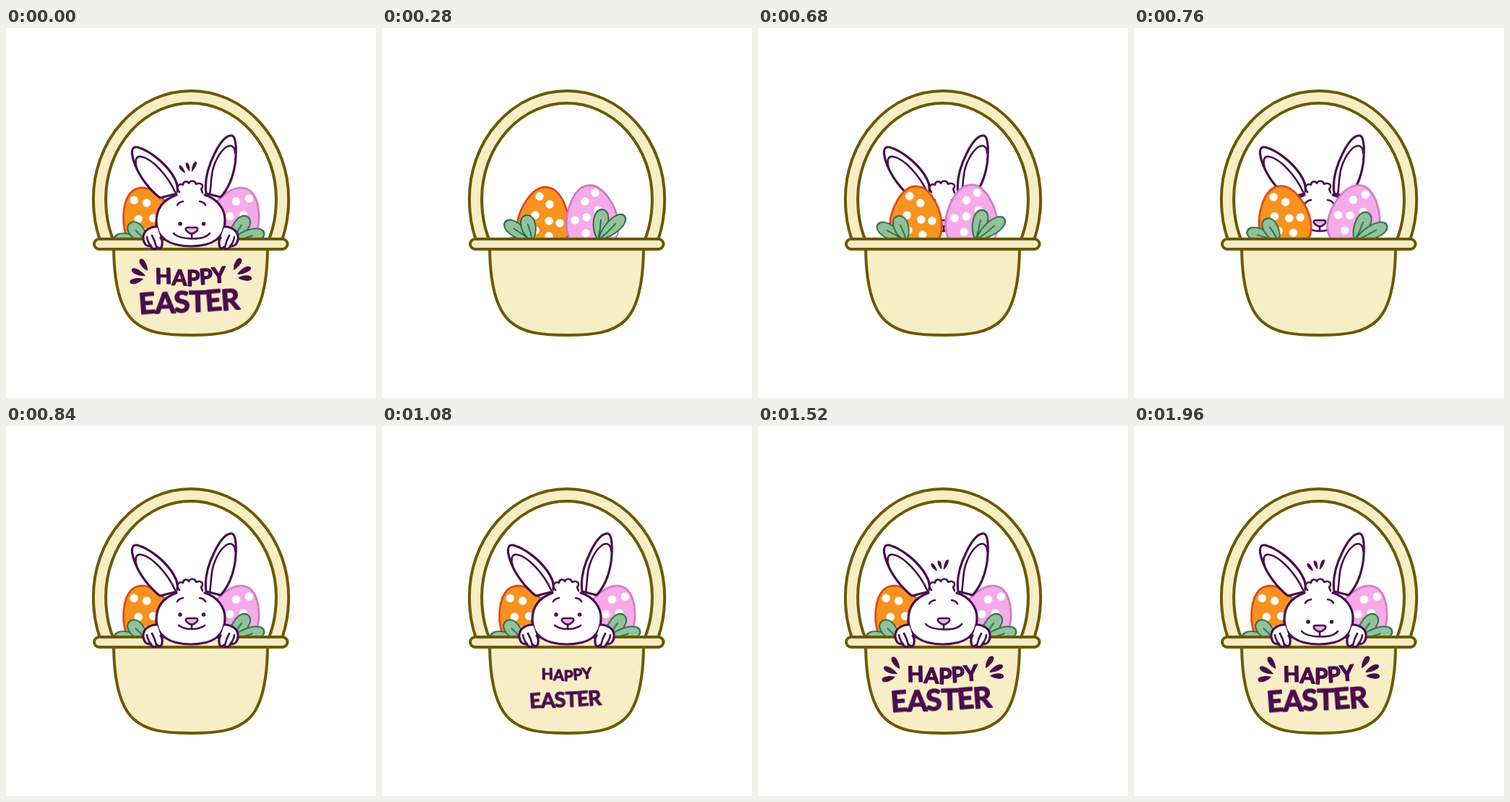
Animation, 512 px wide and 512 px high, one loop 2880 ms. Source, as an HTML page without scripts:

```html
<!DOCTYPE html>
<html lang="en">
<head>
<meta charset="utf-8">
<title>Happy Easter</title>
<style>
  html, body { margin: 0; width: 100%; height: 100%; overflow: hidden; background: #fff; }
  svg { display: block; width: 100%; height: 100%; }

  .basket { fill: #f8eec5; stroke: #6b5903; stroke-width: 4; }
  .ink { fill: none; stroke: #4a0d4f; stroke-width: 3.2; stroke-linecap: round; stroke-linejoin: round; }
  .fur { fill: #fff; }
  .thin { stroke-width: 2.6; }
  .bare { stroke: none; }
  .solid { fill: #4a0d4f; stroke: none; }
  .nose { fill: #e8b4e6; }
  .orange { fill: #f7931e; stroke: #dc4416; stroke-width: 2.6; }
  .pink { fill: #f6abe8; stroke: #cd78c6; stroke-width: 2.6; }
  .dots { fill: #fff; }
  .leaf { fill: #92c19b; stroke: #226b40; stroke-width: 2; stroke-linecap: round; }
  text { font-family: Lato, sans-serif; font-weight: 700; text-anchor: middle;
         fill: #4a0d4f; stroke: #4a0d4f; stroke-width: 1.6; stroke-linejoin: round; }

  .part, .back, .front, .word, .rays, .face { animation: 2880ms step-end infinite; }
  .part { animation-name: part; }
  .back { animation-name: rise, back; }
  .front { animation-name: front; }
  .word { animation-name: word; }
  .rays { animation-name: rays; }
  .calm { animation-name: calm; }
  .happy { animation-name: happy; }
  .shy { animation-name: shy; }

  /* eggs swing apart about a point inside the basket */
  @keyframes part {
    0% { transform: rotate(var(--turn)); }
    1.388% { transform: rotate(0deg); }
    22.222% { transform: rotate(0deg); animation-timing-function: steps(5); }
    29.166%, 100% { transform: rotate(var(--turn)); }
  }
  @keyframes rise {
    0% { transform: translateY(168px); }
    8.333% { transform: translateY(168px); animation-timing-function: steps(4); }
    13.888%, 100% { transform: translateY(0); }
  }
  @keyframes back { 0% { opacity: 0; } 1.388% { opacity: 1; } 27.777%, 100% { opacity: 0; } }
  @keyframes front { 0% { opacity: 1; } 1.388% { opacity: 0; } 27.777%, 100% { opacity: 1; } }
  @keyframes calm { 0% { opacity: 0; } 1.388% { opacity: 1; } 43.055%, 100% { opacity: 0; } }
  @keyframes happy { 0% { opacity: 0; } 43.055% { opacity: 1; } 68.055%, 100% { opacity: 0; } }
  @keyframes shy { 0% { opacity: 1; } 1.388% { opacity: 0; } 68.055%, 100% { opacity: 1; } }
  @keyframes word {
    0% { transform: scale(1); }
    1.388% { transform: scale(0); }
    34.722% { transform: scale(.2); }
    36.111% { transform: scale(.47); }
    37.499% { transform: scale(.715); }
    38.888% { transform: scale(.92); }
    40.277% { transform: scale(1.05); }
    41.666% { transform: scale(1.1); }
    43.055% { transform: scale(1.08); }
    44.444% { transform: scale(1.035); }
    45.833% { transform: scale(1.01); }
    47.222%, 100% { transform: scale(1); }
  }
  @keyframes rays {
    0% { transform: scale(1); }
    1.388% { transform: scale(0); }
    41.666% { transform: scale(.18); }
    43.055% { transform: scale(.45); }
    44.444% { transform: scale(.7); }
    45.833% { transform: scale(.92); }
    47.222% { transform: scale(1.05); }
    48.611% { transform: scale(1.1); }
    50% { transform: scale(1.07); }
    51.388% { transform: scale(1.03); }
    52.777%, 100% { transform: scale(1); }
  }
</style>
</head>
<body>
<svg viewBox="0 0 512 512" role="img" aria-label="Bunny in an Easter basket">
  <defs>
    <clipPath id="above"><rect width="512" height="298"/></clipPath>
    <path id="hoop" d="M142 300C133 280 129.500 258 129.500 236.500A126.500 141 0 0 1 382.500 236.500C382.500 258 379 280 370 300"/>
    <path id="egg" d="M0-53C21-53 36-19 36 3C36 26 20 38 0 38S-36 26-36 3C-36-19-21-53 0-53Z"/>
    <circle id="dot" r="5.700"/>
    <g id="leaf">
      <path d="M0 0C-15-12-16-41-1-41C14-41 14-14 0 0Z"/>
      <path d="M0 0Q1-14-1-27"/>
    </g>
    <path id="ray" d="M0 0C-4-4-7-17-1.500-19C4.500-20.500 4-7 0 0Z"/>
    <g id="bunny">
      <path class="fur" d="M237 229C238 219 237 213 229 201C217 184 197 169 182 165C173 163 173 173 177 185C184 206 199 224 213 235Z"/>
      <path class="thin" d="M234 227C224 205 203 181 187 178C179 177 178 184 181 194"/>
      <path class="fur" d="M277 229C274 210 280 191 289 173C298 155 306 148 313 149C319 151 319 172 317 188C314 208 308 222 297 234Z"/>
      <path class="thin" d="M282 230C284 219 283 206 287 193C293 174 304 162 311 163C315 164 317 168 317 173"/>
      <path class="fur bare" d="M236 231L240 222H270L275 231L290 245H221Z"/>
      <path class="fur" d="M236 231C216 238 208 252 208 268C208 290 226 302 256 302S303 290 303 266C303 250 292 236 275 231"/>
      <path class="fur thin" d="M240 227C235 222 238 214 245 217C245 212 251 211 253 215C255 210 262 211 263 216C270 213 275 218 270 223L272 228"/>
    </g>
    <path id="brows" class="thin" d="M237 243Q239 239 245 238M268 238Q274 239 276 243"/>
    <g id="muzzle" class="thin">
      <path class="nose" d="M251 266H263Q267 267 264 271L260 274Q257 275 254 274L250 271Q247 267 251 266Z"/>
      <path d="M257 275V281"/>
    </g>
    <g id="eyes" class="solid"><circle cx="241" cy="261" r="2.800"/><circle cx="273.500" cy="261" r="2.800"/></g>
    <path id="grin" class="thin" d="M232 274Q238 281 257 281.500T282 274"/>
    <g id="calm">
      <use href="#brows"/><use href="#eyes"/><use href="#muzzle"/>
      <path class="thin" d="M239 276Q246 281 257 281T275 276"/>
    </g>
    <g id="paw">
      <path class="fur" d="M209 275C196 275 189 283 190 292C191 299 195 303 200 301C202 307 208 307 209 303C213 307 216 304 216 299C217 295 216 293 214 290"/>
      <path class="thin" d="M195 289Q196 296 200 301M202 287Q206 294 208 303"/>
    </g>
  </defs>

  <g fill="none">
    <use href="#hoop" stroke="#6b5903" stroke-width="21.200"/>
    <use href="#hoop" stroke="#f8eec5" stroke-width="13.200"/>
  </g>

  <g clip-path="url(#above)">
    <g class="back ink"><use href="#bunny"/><use href="#calm"/></g>
  </g>

  <g class="part" style="--turn: -26deg; transform-origin: 209px 324px">
    <use href="#egg" class="orange" transform="translate(223 273) rotate(6)"/>
    <g class="dots">
      <use href="#dot" x="218" y="233"/><use href="#dot" x="232" y="244"/>
      <use href="#dot" x="212" y="259"/><use href="#dot" x="231" y="267"/>
      <use href="#dot" x="246" y="270"/><use href="#dot" x="212" y="280"/>
      <use href="#dot" x="231" y="288"/>
    </g>
    <g class="leaf">
      <use href="#leaf" transform="translate(207 295) rotate(-53) scale(.85 1.100)"/>
      <use href="#leaf" transform="translate(208 295) rotate(-13) scale(.9)"/>
    </g>
  </g>

  <g class="part" style="--turn: 28deg; transform-origin: 299.5px 315px">
    <use href="#egg" class="pink" transform="translate(291 270.500) rotate(-6)"/>
    <g class="dots">
      <use href="#dot" x="295" y="228"/><use href="#dot" x="281" y="240"/>
      <use href="#dot" x="299" y="252"/><use href="#dot" x="283" y="262"/>
      <use href="#dot" x="267" y="266"/><use href="#dot" x="282" y="284"/>
      <use href="#dot" x="320" y="283"/>
    </g>
    <g class="leaf">
      <use href="#leaf" transform="translate(299 293) rotate(10) scale(.92 1.030)"/>
      <use href="#leaf" transform="translate(300 293) rotate(48) scale(.85 1.180)"/>
    </g>
  </g>

  <g class="basket">
    <path d="M149 300C149 352 158 388 176 405C194 422 220 425 256 425S318 422 336 405C354 388 362 352 362 300Z"/>
    <rect x="122" y="292" width="267.500" height="14" rx="7"/>
  </g>

  <g class="front ink">
    <use href="#bunny"/>
    <use href="#paw"/>
    <use href="#paw" transform="translate(511) scale(-1 1)"/>
    <g class="face calm"><use href="#calm"/></g>
    <g class="face happy">
      <use href="#brows" y="3"/><use href="#muzzle"/><use href="#grin"/>
    </g>
    <g class="face shy">
      <use href="#brows" y="2"/><use href="#eyes" y="10"/>
      <use href="#muzzle" y="10"/><use href="#grin" y="10"/>
    </g>
  </g>

  <g class="solid">
    <g class="rays" style="transform-origin: 254px 205px">
      <use href="#ray" transform="translate(248 201) rotate(-35) scale(.6 .7)"/>
      <use href="#ray" transform="translate(254 198) rotate(-17) scale(.6 .65)"/>
      <use href="#ray" transform="translate(257 199) rotate(25) scale(.6 .8)"/>
    </g>
    <g class="rays" style="transform-origin: 190px 341px">
      <use href="#ray" transform="translate(196 336) rotate(-29)"/>
      <use href="#ray" transform="translate(193 343) rotate(-62) scale(1 1.100)"/>
      <use href="#ray" transform="translate(190 347) rotate(-102)"/>
    </g>
    <g class="rays" style="transform-origin: 321px 337px">
      <use href="#ray" transform="translate(315 335) rotate(34)"/>
      <use href="#ray" transform="translate(320 341) rotate(65) scale(1 1.100)"/>
      <use href="#ray" transform="translate(321 346) rotate(94)"/>
    </g>
  </g>

  <g class="word" style="transform-origin: 255.5px 343px">
    <text x="256" y="354" font-size="29.500" dy="0 1.500 1 -1.500 -2" rotate="-1 2 0 -4 -5">HAPPY</text>
  </g>
  <g class="word" style="transform-origin: 254.5px 378px">
    <text x="254" y="393" font-size="40" letter-spacing="-1.200" transform="rotate(-2.500 254 394)" rotate="-2 1 -1 1 -2 -2">EASTER</text>
  </g>
</svg>
</body>
</html>
```
